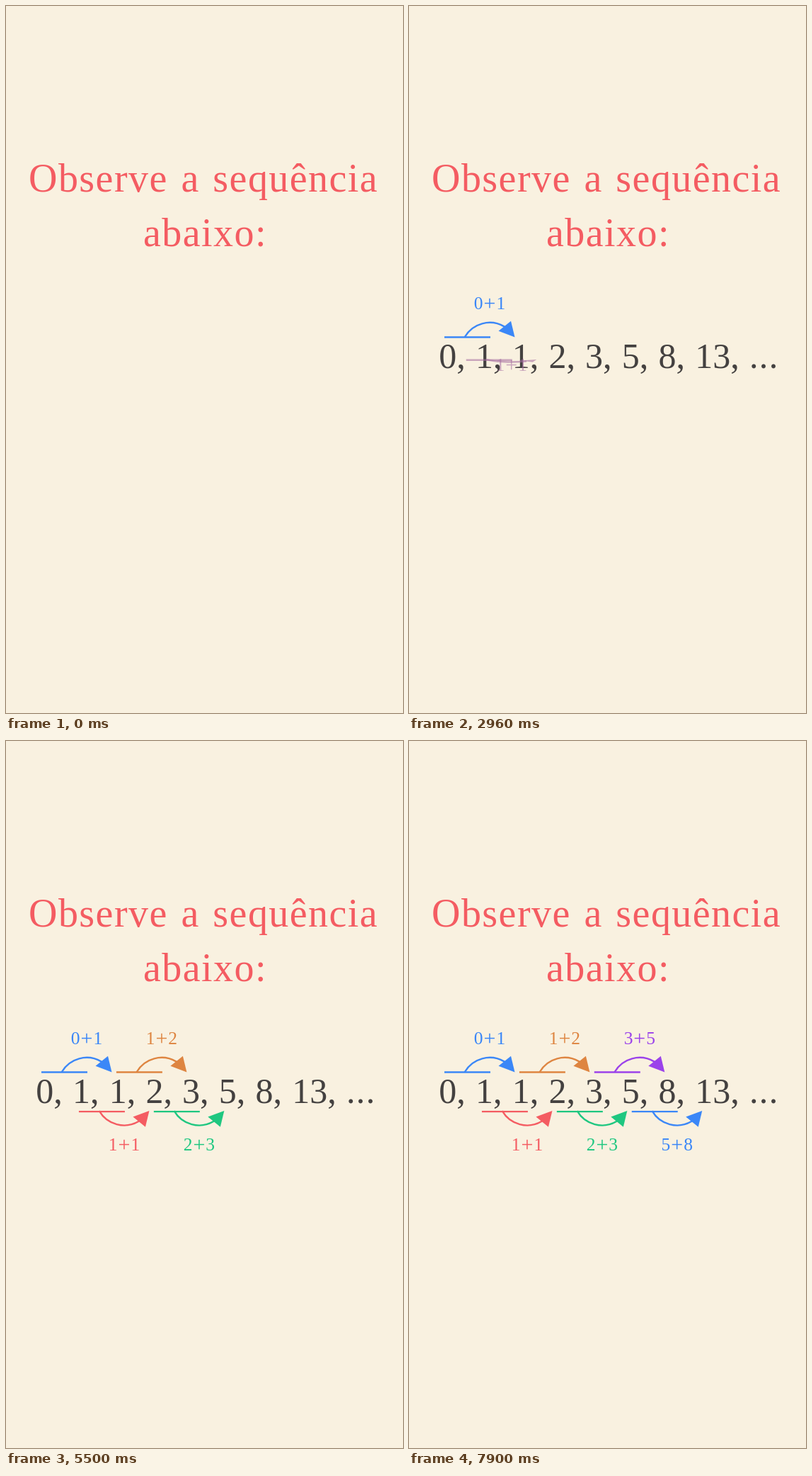
Write an HTML page with a canvas that moves like this. It is 561 px wide and 998 px high and loops after 8000 ms.

```html
<!DOCTYPE html>
<html lang="pt">
<head>
<meta charset="utf-8">
<style>
  html, body { margin: 0; overflow: hidden; background: #f9f1e0; }
  canvas { display: block; }
</style>
</head>
<body>
<canvas id="stage" width="561" height="998"></canvas>
<script>
const ctx = document.getElementById('stage').getContext('2d');
const LOOP = 8000, SERIF = '"Liberation Serif", serif';
const BLUE = [59, 135, 247], RED = [244, 92, 98], ORANGE = [222, 133, 65],
      GREEN = [31, 199, 128], PURPLE = [155, 66, 234];
const HOPS = [['0', '1', BLUE], ['1', '1', RED], ['1', '2', ORANGE],
              ['2', '3', GREEN], ['3', '5', PURPLE], ['5', '8', BLUE]];

const clamp = x => Math.min(1, Math.max(0, x));
const mix = (a, b, p) => a + (b - a) * p;
const sigmoid = x => 1 / (1 + Math.exp(-x));
const smooth = t => {
  const edge = sigmoid(-5);
  return clamp((sigmoid(10 * (t - 0.5)) - edge) / (1 - 2 * edge));
};

function text(str, x, y, size, align = 'center') {
  ctx.font = `${size}px ${SERIF}`;
  ctx.textAlign = align;
  ctx.fillText(str, x, y);
}

function drawTitle() {
  ctx.fillStyle = `rgb(${RED})`;
  ctx.letterSpacing = '1.45px';
  ctx.wordSpacing = '3.2px';
  text('Observe a sequência', 32, 262, 56, 'left');
  text('abaixo:', 194, 339, 56, 'left');
  ctx.letterSpacing = ctx.wordSpacing = '0px';
}

// Each glyph is outlined, then filled, one slightly after the other.
function drawSequence(time) {
  const glyphs = [...'0,1,1,2,3,5,8,13,...'], lag = 0.2;
  const progress = clamp((time - 220) / 700) * (1 + lag * (glyphs.length - 1));
  let x = 42.3;
  ctx.fillStyle = ctx.strokeStyle = '#444140';
  ctx.lineWidth = 1;
  glyphs.forEach((glyph, i) => {
    const p = clamp(progress - i * lag), outline = clamp(p * 2), fill = clamp(p * 2 - 1);
    ctx.globalAlpha = fill;
    text(glyph, x, 511, 50, 'left');
    if (p > 0 && p < 1) {
      ctx.globalAlpha = 1 - fill;
      ctx.setLineDash([outline * 130, 130]);
      ctx.strokeText(glyph, x, 511);
      ctx.setLineDash([]);
    }
    x += glyph === ',' ? 26.7 : glyph === '.' ? 13.9 : 25;
  });
  ctx.globalAlpha = 1;
}

// Builds a path around (x, y), flipped or flattened by side.
function tracePath(x, y, side, build) {
  ctx.save();
  ctx.translate(x, y);
  ctx.scale(1, side);
  ctx.beginPath();
  build();
  ctx.restore();
}

// side: 1 above the sequence, -1 below, and between while crossing over.
function drawHop(x, side, first, second, color, alpha) {
  ctx.globalAlpha = alpha;
  ctx.fillStyle = ctx.strokeStyle = `rgb(${color})`;
  ctx.lineWidth = 2.4;

  tracePath(x, 495.3, side, () => {
    ctx.moveTo(-64, -27.8);
    ctx.lineTo(1, -27.8);
  });
  ctx.stroke();

  tracePath(x, 494.7, side, () =>
    ctx.arc(0, -7.1, 40.7, -Math.PI * 5 / 6, -1.02));
  ctx.stroke();

  tracePath(x, 494.7, side, () => {
    ctx.moveTo(35.5, -27.2);
    ctx.lineTo(12.5, -35.9);
    ctx.lineTo(30, -50);
    ctx.closePath();
  });
  ctx.fill();

  const base = 503 - 75 * side;
  text(first, x - 15.8, base, 25.5);
  text('+', x, base + 1.3, 30);
  text(second, x + 15.8, base, 25.5);
  ctx.globalAlpha = 1;
}

function draw(time) {
  ctx.clearRect(0, 0, 561, 998);
  drawTitle();
  drawSequence(time);
  HOPS.forEach(([first, second, color], k) => {
    const p = k ? smooth((time - 2606 - 1066.7 * (k - 1)) / 667)
                : smooth((time - 1600) / 567);
    if (p <= 0) return;
    const end = k % 2 ? -1 : 1, previous = HOPS[k - 1];
    if (previous)
      drawHop(114 + 52.95 * (k - 1 + p), mix(-end, end, p), first, second,
              color.map((c, i) => mix(previous[2][i], c, p)), p);
    else
      drawHop(114, end, first, second, color, p);
  });
}

function frame() {
  draw(performance.now() % LOOP);
  requestAnimationFrame(frame);
}
frame();
</script>
</body>
</html>
```
